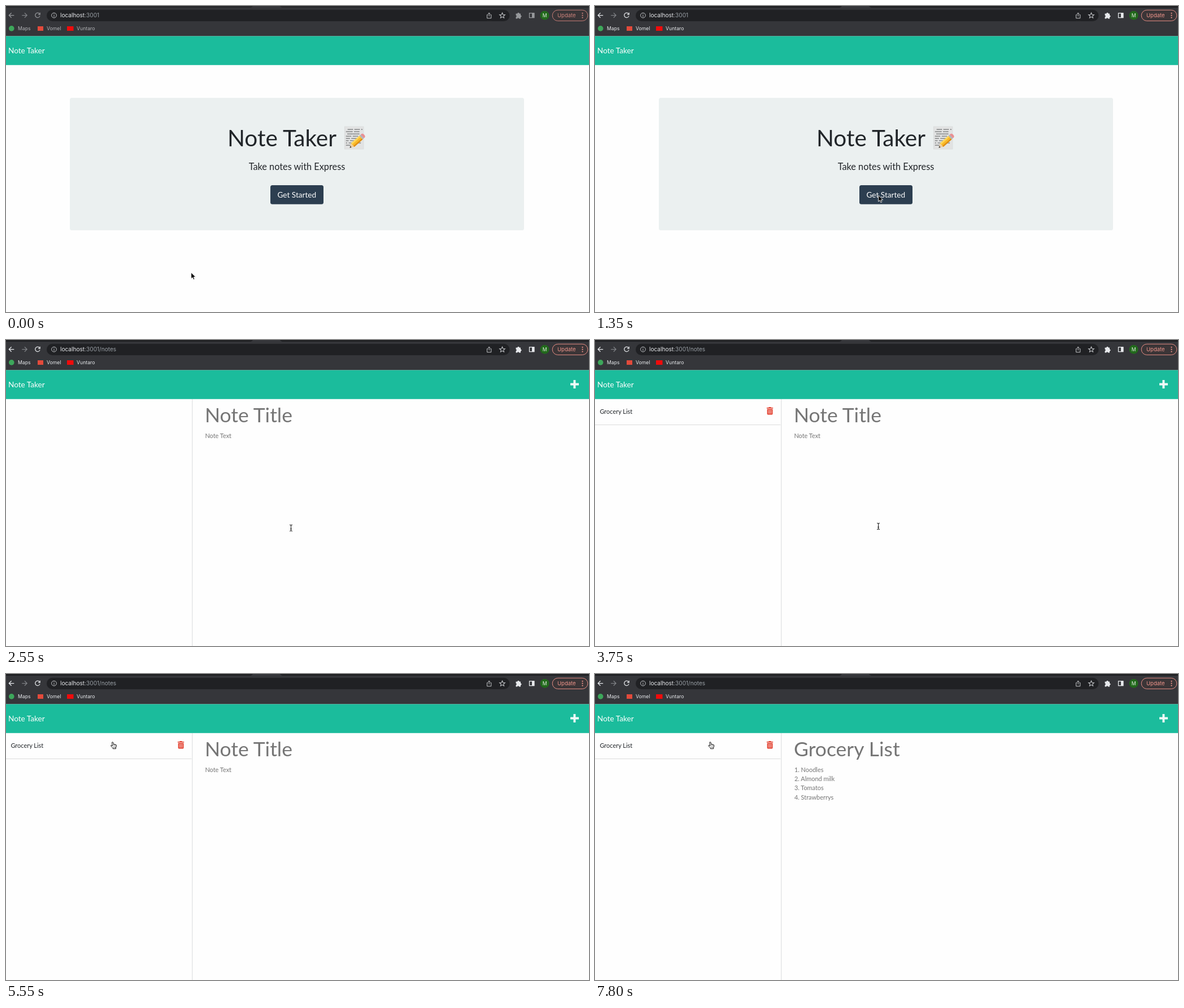
Recreate the animation shown at these times as an HTML page. Size 1032 by 543 pixels, loop 8000 ms.

```html
<!DOCTYPE html>
<html lang="en">
<head>
<meta charset="utf-8">
<title>Note Taker</title>
<style>
html, body { margin: 0; width: 100%; height: 100%; overflow: hidden; background: #fefefe; }
svg { display: block; width: 1032px; height: 543px; }
text { font-family: Lato, sans-serif; white-space: pre; }
.ui text { font-family: Inter, Roboto, sans-serif; }
.line { fill: none; stroke: #e8eaed; stroke-width: 1.25; }
.bm { font-size: 8.7px; fill: #e8eaed; }
.dim .icons { opacity: .55; }
.dim .bm { fill: #b2b3b6; }
.mid { text-anchor: middle; }
.body { font-size: 10.95px; }
.gray { fill: #757575; }
.title { font-size: 35.5px; }
</style>
</head>
<body>
<svg viewBox="0 0 1032 543">
  <rect width="1032" height="543" fill="#fefefe"/>

  <g class="ui" id="bar">
    <rect width="1032" height="53.5" fill="#35363a"/>
    <path id="strip" d="M0 0H437Q436 2 433 3H0ZM485 0H1032V3H489Q486 2 485 0Z" fill="#202124"/>
    <rect x="72" y="6.8" width="819.5" height="20.2" rx="10.1" fill="#202124"/>

    <g class="icons">
      <path class="line" d="M14.3 16.5H5.6M9.6 12.2L5.3 16.5L9.6 20.8"/>
      <path id="reload" class="line" d="M59.3 13.8A4.2 4.2 0 1 0 60 17.6M60.2 11.8V15H57"/>
      <path id="stop" class="line" d="M52.2 12.7L59.8 20.3M59.8 12.7L52.2 20.3" stroke-width="1.4"/>
      <path d="M903 13.5h2.3a1.7 1.7 0 0 1 3.4 0h2.3v3a1.6 1.6 0 0 1 0 3.2v2.8h-2.8a1.6 1.6 0 0 0-3.1 0H902.600v-3a1.6 1.6 0 0 0 0-3.1v-2.900z" fill="#e8eaed"/>
      <rect class="line" x="926.5" y="12.700" width="8.400" height="8"/>
      <rect x="931" y="12.500" width="4.200" height="8.400" fill="#e8eaed"/>
    </g>
    <path class="line" d="M28.200 16.500H36.900M32.900 12.200L37.200 16.500L32.900 20.800" style="stroke:#7e8084"/>
    <g opacity=".82">
      <circle class="line" cx="85" cy="16.600" r="4.400" style="stroke-width:1"/>
      <path class="line" d="M85 16V19.200M85 13.900V15" style="stroke-width:1"/>
      <path class="line" d="M853.300 15.500H851.600V21.700H858.800V15.500H857.100M855.200 18.500V12.300M853.200 14L855.200 12L857.200 14" style="stroke-width:1"/>
      <path class="line" d="M878.500 12l1.400 3.200 3.500.3-2.650 2.300.8 3.400-3.050-1.800-3.050 1.800.8-3.400-2.650-2.300 3.500-.3z" style="stroke-width:1.050"/>
    </g>
    <text x="96" y="20.300" font-size="10.100" fill="#e8eaed">localhost<tspan fill="#9aa0a6" id="path">:3001</tspan></text>

    <circle cx="953.600" cy="16.700" r="8" fill="#22691c"/>
    <text class="mid" x="953.600" y="19.800" font-size="8.600" fill="#e6efe5">M</text>
    <g id="update" fill="#f0968c">
      <rect x="967.200" y="7.200" width="62.600" height="19.200" rx="9.600" fill="#3b3537" stroke="#e58d84" stroke-width="1"/>
      <text x="976" y="20.200" font-size="9.500">Update</text>
      <circle cx="1020.500" cy="12.800" r="1.100"/><circle cx="1020.500" cy="16.700" r="1.100"/><circle cx="1020.500" cy="20.600" r="1.100"/>
    </g>

    <circle cx="9.800" cy="39.900" r="4.800" fill="#3da75b"/>
    <text class="bm" x="21" y="43">Maps</text>
    <rect x="56" y="36" width="10" height="8" fill="#e24a3b"/>
    <text class="bm" x="72" y="43">Vomel</text>
    <rect x="108" y="36" width="11.500" height="8" fill="#f00b0b"/>
    <text class="bm" x="125" y="43">Vuntaro</text>
  </g>

  <rect y="53.500" width="1032" height="51.300" fill="#1bbc9c"/>
  <text x="4" y="83.800" font-size="13.580" fill="#fff">Note Taker</text>

  <g id="home">
    <rect x="113" y="163" width="804" height="235" rx="3.500" fill="#ebf0f0"/>
    <text x="392" y="249" font-size="40.560" fill="#212529">Note Taker</text>
    <g>
      <rect x="599.300" y="214" width="33.700" height="40" fill="#e2e3e3" stroke="#d3d5d5" stroke-width=".6"/>
      <path id="script" fill="none" stroke="#55585a" stroke-width=".9"/>
      <g transform="translate(608.500 251.500) rotate(-42)">
        <path d="M0 0L7 -4.300V4.300Z" fill="#f0cf9f"/>
        <path d="M0 0L2.800 -1.700V1.700Z" fill="#333"/>
        <path d="M7 -4.300H27V4.300H7Z" fill="#f9b928"/>
        <path d="M7 -4.300H27V-1.500H7Z" fill="#ffd65a"/>
        <path d="M7 2H27V4.300H7Z" fill="#df8d15"/>
        <path d="M27 -4.300H30V4.300H27Z" fill="#b3b6ba"/>
        <path d="M30 -4.300H31.500Q34.500 -4 34.500 0T31.500 4.300H30Z" fill="#ea8f92"/>
      </g>
    </g>
    <text class="mid" x="515" y="290.800" font-size="16.300" fill="#212529">Take notes with Express</text>
    <rect id="ring" x="466" y="315.800" width="98" height="38" rx="5" fill="#959ea7"/>
    <rect id="button" x="468" y="318" width="94" height="33.700" rx="3.500"/>
    <text class="mid" x="514.800" y="339.700" font-size="13.580" fill="#fff">Get Started</text>
  </g>

  <g id="notes">
    <path d="M999 78.500H1014M1006.400 71V86" stroke="#f1faf8" stroke-width="3.900"/>
    <path d="M329.800 105V543" stroke="#dee0e2" stroke-width="1.200"/>
    <g id="list">
      <text class="body" x="8.400" y="131.400" fill="#212529">Grocery List</text>
      <path d="M0 150.500H328.500" stroke="#dcdddd"/>
      <g fill="#e3402f">
        <path d="M303.900 120H307L307.800 118.900H311.300L312.100 120H315.200V121.600H303.900Z"/>
        <path d="M304.700 122.400H314.500V131Q314.500 132.400 313.200 132.400H306Q304.700 132.400 304.700 131Z"/>
        <path d="M307.200 124V130.800M309.600 124V130.800M312 124V130.800" stroke="#fff" stroke-width=".8"/>
      </g>
    </g>
    <g class="gray" id="blank">
      <text class="title" x="352" y="146">Note Title</text>
      <text class="body" x="352.400" y="173.600">Note Text</text>
    </g>
    <g class="gray" id="filled">
      <text class="title" x="352" y="146">Grocery List</text>
    </g>
  </g>

  <g id="arrow" stroke-linejoin="round">
    <path d="M0 0V11L2.500 8.700L4.200 12.600L6.100 11.800L4.500 8H8Z" fill="#000" stroke="#fff" stroke-width=".9"/>
  </g>
  <g id="hand">
    <path d="M2.600 1.700Q2.500 .5 3.500 .5T4.800 1.600L5.500 4.600Q6.500 4 7.200 4.900Q8.200 4.300 8.900 5.300Q10.300 5 10.400 6.500Q10.500 9 9.400 10.500V12.400H4.200V11.200Q2.500 9.500 .9 7.700Q.2 6.600 1.100 6.200Q2 6 3.500 7.500Z" fill="#fff" stroke="#000" stroke-width=".95" stroke-linejoin="round"/>
    <path d="M5.500 4.600V6.800M7.200 4.900V7M8.900 5.300V7.100M5.500 8.700V10.700M7 8.700V10.700M8.500 8.700V10.700" fill="none" stroke="#000" stroke-width=".6"/>
  </g>
  <g id="beam">
    <path d="M-2.500 -5.600Q-.4 -5.600 0 -4.500Q.4 -5.600 2.500 -5.600M0 -4.500V4.500M-2.500 5.600Q-.4 5.600 0 4.500Q.4 5.600 2.500 5.600M-1.400 1.600H1.400" fill="none" stroke="#222" stroke-width="1.100"/>
  </g>
</svg>
<script>
const LOOP = 8000, TICK = 150;
const el = id => document.getElementById(id);
const show = (id, on) => { el(id).style.display = on ? '' : 'none'; };

// Pointer poses: time, shape, x, y
const poses = [[0, 'arrow', 327.7, 473]];
const glide = (start, shape, from, to, parts) => parts.forEach((p, i) =>
  poses.push([start + i * TICK, shape, from[0] + (to[0] - from[0]) * p, from[1] + (to[1] - from[1]) * p]));

glide(300, 'arrow', [327.7, 473], [501.7, 336], [.06, .36, .72, .94, 1]);
poses.push([1500, 'hand', 500.8, 332.2]);
poses.push([2550, 'beam', 504.5, 333.6]);
glide(3750, 'beam', [504.5, 333.6], [475.5, 303], [.1, .38, .7, .92, 1]);
glide(4800, 'beam', [475.5, 303], [291.7, 153], [.1, .56]);
poses.push([5100, 'arrow', 291.7, 153]);
poses.push([5400, 'hand', 218, 127]);
glide(5550, 'hand', [185, 120.2], [185, 120.2], [1]);
glide(6000, 'hand', [185, 120.2], [200.3, 120.2], [.65, 1]);

// Button looks: time, fill, ring opacity
const looks = [
  [0, '#2c3e50', 0], [1500, '#263645', 0], [1650, '#1e2b37', 0],
  [1800, '#1a252f', .5], [1950, '#1a252f', 1], [2100, '#1e2b37', 1]
];
const at = (table, t) => table.filter(row => row[0] <= t).pop();

// Handwriting on the paper
let ink = '';
for (let row = 0; row < 8; row++) {
  const y = 219.5 + row * 4;
  const end = row === 7 ? 613 : 629 - (row % 3) * 2;
  for (let x = row ? 602 : 605; x < end; x += 2.4) {
    if ((x * 7 + row * 5 | 0) % 6) ink += `M${x} ${y}l.7 -1.2l.6 1.3l.7 -.8`;
  }
}
el('script').setAttribute('d', ink);

['1. Noodles', '2. Almond milk', '3. Tomatos', '4. Strawberrys'].forEach((line, i) => {
  const text = document.createElementNS('http://www.w3.org/2000/svg', 'text');
  text.setAttribute('class', 'body');
  text.setAttribute('x', 352.9);
  text.setAttribute('y', 173.6 + i * 16.3);
  text.textContent = line;
  el('filled').append(text);
});

function draw(t) {
  const active = t >= 1200, opened = t >= 2550, loading = t >= 2400 && !opened;
  el('bar').classList.toggle('dim', !active);
  el('strip').setAttribute('fill', active ? '#202124' : '#28292c');
  el('update').style.opacity = active ? 1 : .82;
  el('path').textContent = opened ? ':3001/notes' : ':3001';
  show('reload', !loading);
  show('stop', loading);

  show('home', !opened);
  show('notes', opened);
  show('list', t >= 2700);
  show('blank', t < 6450);
  show('filled', t >= 6450);

  const [, fill, ring] = at(looks, t);
  el('button').setAttribute('fill', fill);
  el('ring').style.opacity = ring;

  const [, shape, x, y] = at(poses, t);
  for (const id of ['arrow', 'hand', 'beam']) show(id, id === shape);
  el(shape).setAttribute('transform', `translate(${x} ${y})`);
}

function frame() {
  draw(performance.now() % LOOP);
  requestAnimationFrame(frame);
}
frame();
</script>
</body>
</html>
```
